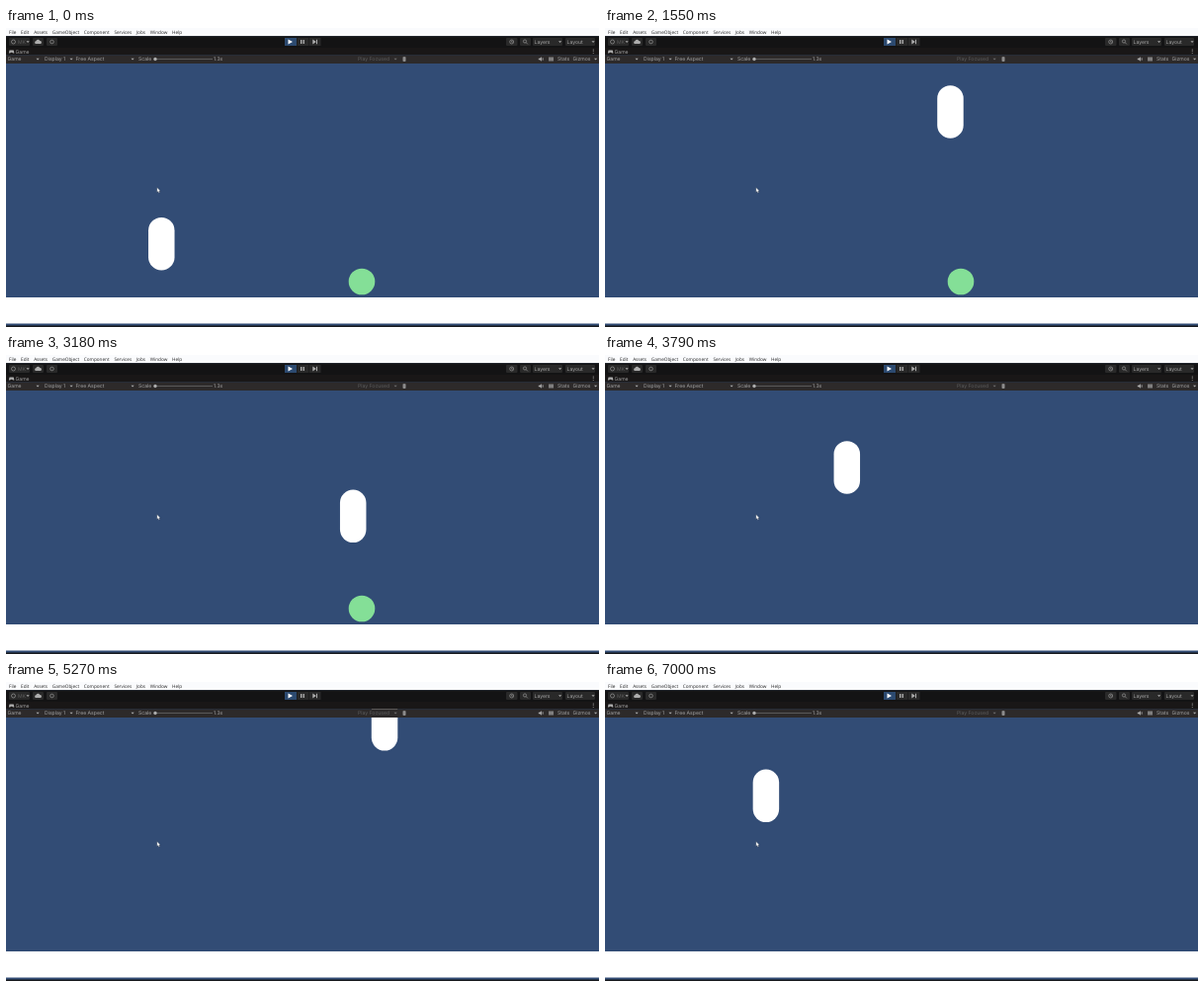
An HTML page that plays this animation: 600x303 px, repeating every 7.03 s.

```html
<!DOCTYPE html>
<html lang="en">
<head>
<meta charset="utf-8">
<title>Capsule jump</title>
<style>
  html, body { margin: 0; width: 100%; height: 100%; overflow: hidden; background: #324c75; }
  svg { display: block; width: 100vw; height: 100vh; }
  text { font: 5.1px Inter, Roboto, sans-serif; fill: #a4a4a4; text-rendering: geometricPrecision; }
  #menu { font: 4.7px "Open Sans", "Noto Sans", sans-serif; fill: #222; }
  .dim { fill: #5c5c5c; }
  .btn { fill: #292929; }
  .icon { fill: #adadad; }
  .line { fill: none; stroke: #999; stroke-width: .7; }
</style>
</head>
<body>
<svg viewBox="0 0 600 303">
  <defs><path id="arrow" d="M0 0h3.2l-1.6 1.8z" fill="#adadad"/></defs>

  <rect width="600" height="303" fill="#324c75"/>
  <circle id="ball" cx="360" cy="257" r="13.3" fill="#84df97"/>
  <rect id="hero" width="26.5" height="53.5" rx="13.25" fill="#fff"/>
  <rect y="273" width="600" height="26.5" fill="#fff"/>
  <rect y="301.5" width="600" height="1.5" fill="#17191d"/>

  <rect width="600" height="8.2" fill="#fafbfd"/>
  <rect y="8.2" width="600" height="11.8" fill="#131314"/>
  <rect y="20" width="600" height="7.5" fill="#191717"/>
  <rect y="27.5" width="600" height="8.5" fill="#2d2a2a"/>

  <text id="menu" x="3" y="5.8"></text>

  <!-- Toolbar -->
  <g class="btn">
    <rect x="3" y="10" width="21" height="8" rx="1"/>
    <rect x="27" y="10" width="11" height="8" rx="1"/>
    <rect x="41" y="10" width="11" height="8" rx="1"/>
    <rect x="282" y="10" width="12" height="8" fill="#2c4a70"/>
    <rect x="294.5" y="10" width="11.5" height="8"/>
    <rect x="306.5" y="10" width="12" height="8"/>
    <rect x="506" y="10" width="11.5" height="8" rx="1"/>
    <rect x="520" y="10" width="11" height="8" rx="1"/>
    <rect x="533" y="10" width="30" height="8" rx="1"/>
    <rect x="566" y="10" width="30" height="8" rx="1"/>
  </g>
  <g class="icon">
    <path d="M30 16a1.4 1.4 0 0 1 .4-2.7a2 2 0 0 1 3.8-.4a1.6 1.6 0 0 1 .7 3.1z"/>
    <path d="M285.5 11.5l4.5 2.5l-4.5 2.5z" fill="#fff"/>
    <path d="M298 12h1.4v4h-1.4zM300.5 12h1.4v4h-1.4zM310.3 11.6l3.6 2.4l-3.6 2.4zM314 11.7h1v4.6h-1z"/>
  </g>
  <g class="line">
    <circle cx="7.5" cy="14" r="2"/>
    <circle cx="46.5" cy="14" r="1.8"/>
    <circle cx="511.7" cy="14" r="2"/>
    <path d="M511.7 12.8v1.4h1"/>
    <circle cx="525" cy="13.5" r="1.6"/>
    <path d="M526.2 14.7l1.7 1.7"/>
  </g>
  <text x="12" y="15.8" class="dim">MK</text><use href="#arrow" x="20.5" y="13.2"/>
  <text x="534.5" y="15.8">Layers</text><use href="#arrow" x="559" y="13.2"/>
  <text x="567.5" y="15.8">Layout</text><use href="#arrow" x="592.5" y="13.2"/>

  <!-- Tab -->
  <path class="icon" d="M3.5 22.5h4.2l.7 3h-1.4l-.8-.8h-1.2l-.8.8h-1.4z"/>
  <text x="9.5" y="25.6">Game</text>
  <path class="icon" d="M593.8 21.5h.9v.9h-.9zM593.8 23.2h.9v.9h-.9zM593.8 24.9h.9v.9h-.9z"/>

  <!-- View controls -->
  <text x="1.5" y="33.3">Game</text><use href="#arrow" x="30.5" y="30.7"/>
  <text x="39" y="33.3">Display 1</text><use href="#arrow" x="64.5" y="30.7"/>
  <text x="70.5" y="33.3">Free Aspect</text><use href="#arrow" x="126.5" y="30.7"/>
  <text x="134" y="33.3">Scale</text>
  <rect x="150" y="31.1" width="59" height=".8" fill="#666"/>
  <circle class="icon" cx="151" cy="31.5" r="1.7"/>
  <text x="210" y="33.3">1.3x</text>
  <text x="356" y="33.3" class="dim">Play Focused</text><use href="#arrow" x="392.5" y="30.7" opacity=".5"/>
  <g class="icon">
    <path d="M401.5 29.5q1.5-1.2 3 0v4q-1.5 1.2-3 0z" opacity=".75"/>
    <path d="M538.8 30.7h1.3l1.8-1.5v4.6l-1.8-1.5h-1.3zM542.7 30.2h.8v2.6h-.8z"/>
    <path d="M549 29.5h5v4h-5z" opacity=".65"/>
  </g>
  <text x="558" y="33.3">Stats</text>
  <text x="573.5" y="33.3">Gizmos</text><use href="#arrow" x="595" y="30.7"/>

  <path d="M152.8 161.6v5l1.1-1l.8 1.6l.8-.4l-.7-1.5h1.5z" fill="#fff" stroke="#1b2639" stroke-width=".3"/>
</svg>
<script>
const $ = id => document.getElementById(id);

$("menu").innerHTML = "File Edit Assets GameObject Component Services Jobs Window Help"
  .split(" ").map((word, i) => `<tspan dx="${i && 4.7}">${word}</tspan>`).join("");

const LOOP = 7030, START_X = 157.3, FLOOR = 273, BALL_TAKEN = 3290;
const SPEED = .35, JUMP = .588, HALF_GRAVITY = .00052; // px per ms, px per ms²

// Held arrow keys: pressed, released, direction
const keys = [
  [42, 777, 1], [1365, 1800, -1], [2115, 2369, 1], [3487, 4176, -1],
  [4491, 5391, 1], [5640, 6060, -1], [6672, LOOP, -1]
];
const jumps = [-48, 1083, 2210, 3481, 4500, 6175];

const xAt = t => keys.reduce((x, [down, up, dir]) =>
  x + dir * SPEED * Math.max(0, Math.min(t, up) - down), START_X);

// Each jump starts from the height reached by then, so it also works in mid-air
const heightAt = t => jumps.filter(start => start <= t).reduce((base, start, i, done) => {
  const d = (done[i + 1] ?? t) - start;
  return Math.max(0, base + JUMP * d - HALF_GRAVITY * d * d);
}, 0);

const begin = performance.now();
function draw() {
  const t = (performance.now() - begin) % LOOP;
  $("hero").setAttribute("x", xAt(t) - 13.25);
  $("hero").setAttribute("y", FLOOR - 53.5 - heightAt(t));
  $("ball").setAttribute("visibility", t < BALL_TAKEN ? "visible" : "hidden");
  requestAnimationFrame(draw);
}
draw();
</script>
</body>
</html>
```
